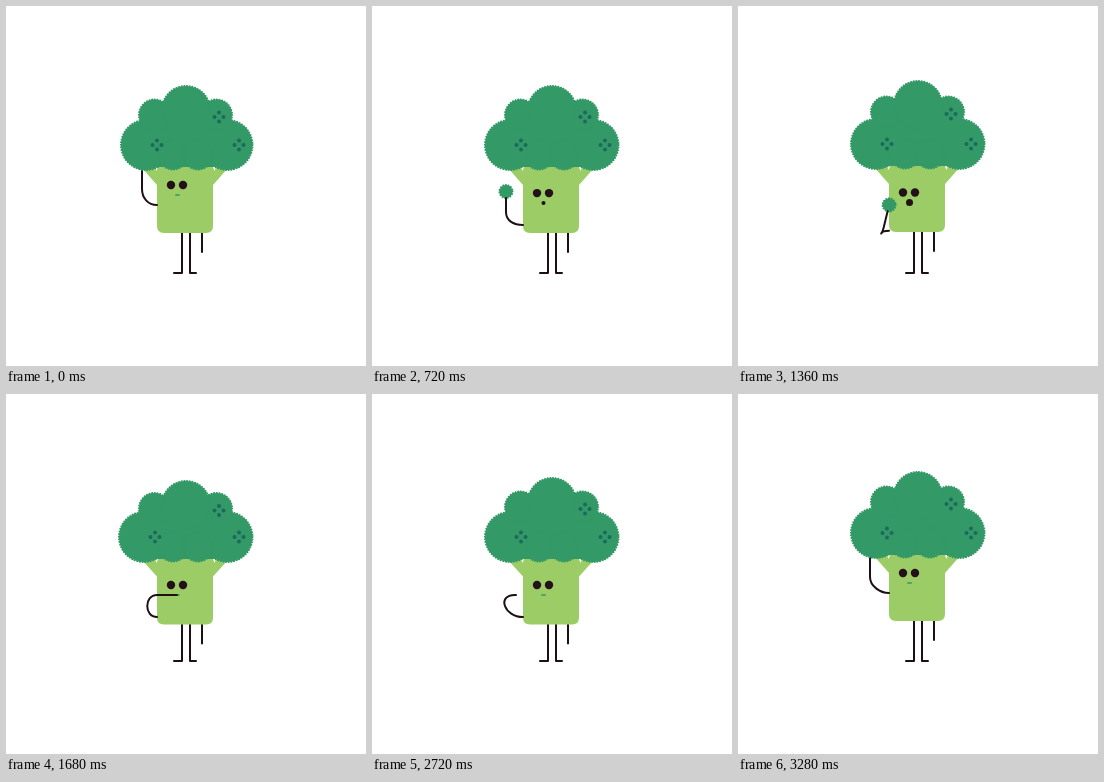
Recreate the animation shown at these times as an HTML page. Size 360 px wide and 360 px high, loop 3360 ms.

```html
<!DOCTYPE html>
<html lang="en">
<head>
<meta charset="utf-8">
<title>Broccoli snack</title>
<style>
  html, body { margin: 0; width: 100%; height: 100%; overflow: hidden; background: #fff; }
  svg { display: block; width: 100%; height: 100%; }
  .line { fill: none; stroke: #1d0f14; stroke-width: 2; stroke-linecap: round; stroke-linejoin: round; }
  .leaf { fill: #339966; }
  .leaf circle, circle.leaf { stroke: #339966; stroke-width: 2.2; stroke-linecap: round; stroke-dasharray: 0 2.7; }
  .stem { fill: #9ccc65; }
  .spot { fill: #1c6a5e; }
  .ink { fill: #231019; }
</style>
</head>
<body>
<svg id="stage" viewBox="0 0 360 360"></svg>
<script>
const LOOP = 3360, STEP = 80;
const stage = document.getElementById('stage');

function set(el, attrs) {
  for (const k in attrs) el.setAttribute(k, attrs[k]);
}
function add(tag, attrs = {}, parent = stage) {
  const el = document.createElementNS('http://www.w3.org/2000/svg', tag);
  set(el, attrs);
  parent.append(el);
  return el;
}

// Eased 0 to 1 between two times
function ramp(t, from, to) {
  const p = Math.min(1, Math.max(0, (t - from) / (to - from)));
  return (1 - Math.cos(Math.PI * p)) / 2;
}
// Eases in from a to b and out again from c to d
const hold = (t, a, b, c, d) => ramp(t, a, b) - ramp(t, c, d);

// Arm poses: hand position, forearm turn (0 upright, 1 level), forearm length, shoulder height
const REACH = { x: 132, y: 163, turn: 0, len: 20, shoulder: 199 };
const PLUCK = { x: 134, y: 192, turn: 0, len: 14, shoulder: 219 };
const AIM = { x: 136, y: 208, turn: 0, len: 15, shoulder: 226 };
const BITE = { x: 171, y: 201, turn: 1, len: 20, shoulder: 223 };
const REST = { x: 144, y: 201, turn: 1, len: 1, shoulder: 223 };

function armPose(t) {
  const pose = { ...REACH };
  const move = (to, from, until) => {
    const e = ramp(t, from, until);
    for (const k in pose) pose[k] += (to[k] - pose[k]) * e;
  };
  move(PLUCK, 0, 480);
  move(AIM, 720, 1120);
  move(BITE, 1240, 1520);
  move(REST, 1680, 1920);
  move(REACH, 2720, 3200);
  return pose;
}

const legs = add('path', { class: 'line' });
const stem = add('path', { class: 'stem' });
const gaps = add('path', { fill: '#fff' });
const eyes = [165, 177].map(cx => add('circle', { class: 'ink', cx, r: 4.2 }));
const mouth = add('rect');
const floret = add('circle', { class: 'leaf', r: 6.5 });
const arm = add('path', { class: 'line' });

const crown = add('g', { class: 'leaf' });
const core = add('rect', { x: 148, width: 64 }, crown);
const lobe = (cx, r) => add('circle', { cx, r }, crown);
const leftLobe = lobe(138, 25), rightLobe = lobe(221.5, 25);
const smallLobes = [lobe(148.5, 15.5), lobe(210.5, 15.5)];
const topLobe = lobe(180, 24);
const frills = [lobe(167, 14.5), lobe(192, 14.5)];

function addSpots() {
  const g = add('g', { class: 'spot' });
  for (let i = 0; i < 4; i++) {
    const a = i * Math.PI / 2;
    add('circle', { cx: 4.5 * Math.cos(a), cy: 4.5 * Math.sin(a), r: 2 }, g);
  }
  return g;
}
const leftSpots = addSpots(), topSpots = addSpots(), rightSpots = addSpots();
const place = (el, x, y) => set(el, { transform: `translate(${x} ${y})` });

function drawBody(base, bend, rim) {
  const bow = 6 * bend * bend;
  set(legs, { d:
    `M${176 - 2 * bend} ${base - 2}Q${176 - 6 * bend} 250 ${176 - bend} 267H168` +
    `M184 ${base - 2}Q${184 + bow} 250 184 267H190` +
    `M196 ${base - 2}V${base + 19}` });
  const neck = base - 48;
  set(stem, { d: `M136 ${rim}L151 ${neck}V${base - 7}q0 7 7 7H200q7 0 7-7V${neck}L222 ${rim}V${rim - 20}H136Z` });
  set(gaps, { d: [150.5, 208.5].map(x => `M${x - 2} ${rim - 2}h4l-2 5Z`).join('') });
}

function drawMouth(t, y) {
  const chewing = t >= 1840 && t < 2720, gaping = t >= 480 && t < 1520;
  let w = 5, h = 1.6;
  if (gaping) w = h = t < 1280 ? 4 : 7;
  if (chewing) {
    w = 6 + 4.5 * Math.abs(Math.cos(Math.PI * (t - 2320) / 320));
    h = 6;
    y += 2;
  }
  set(mouth, {
    x: 171.5 - w / 2, y: y - h / 2, width: w, height: h, rx: h / 2,
    fill: chewing || gaping ? '#231019' : '#339966'
  });
}

function drawArm(t, grip, aim) {
  const { x, y, turn, len, shoulder } = armPose(t);
  const hx = x + 4 * grip;
  const angle = turn * turn * Math.PI / 2;
  const dx = -Math.sin(angle), dy = Math.cos(angle);
  const wx = hx + dx * len, wy = y + dy * len;
  const curl = 9 + turn * (10 - .3 * len);
  set(arm, { d:
    `M${hx} ${y}L${wx} ${wy}C${wx + dx * curl} ${wy + dy * curl} ` +
    `${151 - curl * (1 - aim)} ${shoulder + 9 * aim} 151 ${shoulder}` });
  set(floret, {
    cx: hx - dx * 6.5, cy: y - dy * 6.5,
    visibility: t < 1600 ? 'visible' : 'hidden'
  });
}

function drawCrown(big, small, top, left) {
  set(core, { y: small, height: big + 22 - small });
  set(leftLobe, { cx: left, cy: big });
  set(rightLobe, { cy: big });
  smallLobes.forEach(c => set(c, { cy: small }));
  set(topLobe, { cy: top });
  frills.forEach(c => set(c, { cy: big + 10 }));
  place(leftSpots, left + 11, big);
  place(rightSpots, 233, big);
  place(topSpots, 213, small + 2);
}

function draw(time) {
  let t = Math.floor(time % LOOP / STEP) * STEP;
  if (t > 240 && t < 480) t = 240;

  const pull = hold(t, 0, 240, 480, 720);
  const aim = hold(t, 720, 1120, 1120, 1360);
  const hop = hold(t, 1200, 1360, 1360, 1520);
  const bite = hold(t, 1440, 1640, 1760, 2080);
  const eat = hold(t, 1400, 1600, 2800, 3200);
  const gulp = hold(t, 2720, 2960, 2960, 3200);
  const reach = hold(t, 3040, 3200, 3280, LOOP);
  const gaze = hold(t, 240, 800, 2800, 3200);
  const grip = 1 - hold(t, 0, 160, 3280, LOOP);
  const chew = t > 2000 && t < 2640 ? Math.sin(Math.PI * (t - 2320) / 320) ** 2 : 0;

  const base = 227 + 6 * pull + 4 * aim + 3.5 * eat - hop;
  const big = 139 + 8 * pull + 6 * aim + 4 * eat + 3.5 * gulp - hop + 1.5 * chew;
  const whip = aim + 3 * bite + 4 * gulp - 3 * pull - 4 * hop - 2 * reach;
  const eye = base - 48 + 8.5 * gaze;

  drawBody(base, pull + .4 * aim + .4 * gulp, big + 23);
  eyes.forEach(e => set(e, { cy: eye }));
  drawMouth(t, eye + 10);
  drawArm(t, grip, aim);
  drawCrown(big, big - 30 + whip / 2, big - 35 + whip, 138 + 2 * grip);
}

const start = performance.now();
function frame(now) {
  draw(Math.max(0, now - start));
  requestAnimationFrame(frame);
}
draw(0);
requestAnimationFrame(frame);
</script>
</body>
</html>
```
